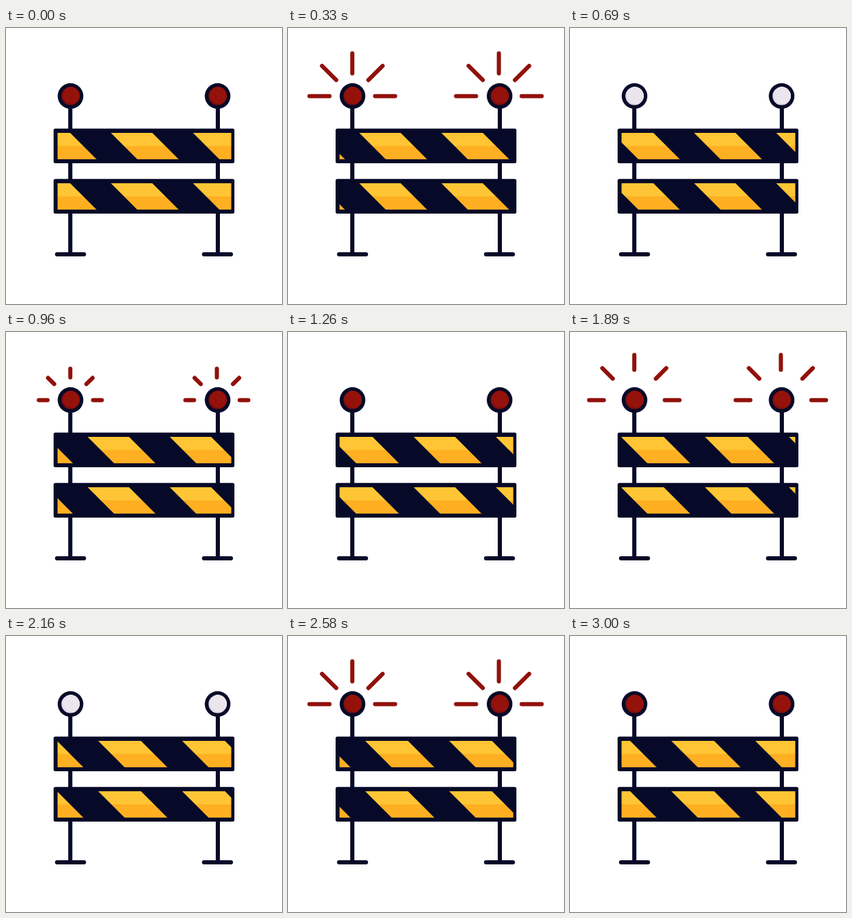
An HTML page for the animation above (5090 ms loop, 400 px wide and 400 px high).

```html
<!DOCTYPE html>
<html lang="en">
<head>
<meta charset="utf-8">
<title>Road barrier</title>
<style>
  html, body { margin: 0; width: 100%; height: 100%; overflow: hidden; background: #fff; }
  svg { display: block; width: 100%; height: 100%; }
</style>
</head>
<body>
<svg id="stage" viewBox="0 0 400 400">
  <defs>
    <clipPath id="panel"><rect x="74.7" y="151.7" width="251.8" height="38.6"/></clipPath>
    <linearGradient id="amber" gradientUnits="userSpaceOnUse" x1="0" y1="151" x2="0" y2="191">
      <stop offset=".5" stop-color="#ffc534"/>
      <stop offset=".5" stop-color="#ffaf22"/>
    </linearGradient>
    <clipPath id="bulb"><circle r="13.5"/></clipPath>
  </defs>
  <g fill="none" stroke="#060a28" stroke-width="6" stroke-linecap="round">
    <path d="M93.2 112V328M74 328H113M307 112V328M287 328H326"/>
  </g>
  <g id="bars"></g>
  <g id="lamps"></g>
  <path id="rays" fill="none" stroke="#91110b" stroke-width="6" stroke-linecap="round"/>
</svg>
<script>
const LOOP = 5090, ACTIVE = 3000, STEP = 30, BLINK = 750;
const byId = id => document.getElementById(id);
const clamp = v => Math.min(1, Math.max(0, v));
const ramp = (t, a, b) => clamp((t - a) / (b - a));

// Stripe travel keys: time, distance, speed
const travel = [
  [0, 0, 0.213], [1620, 345, 0.2135], [2160, 463, 0.224],
  [2580, 563, 0.249], [3000, 598, 0]
];

function distance(t) {
  let i = 0;
  while (i < travel.length - 2 && t > travel[i + 1][0]) i++;
  const [t0, d0, v0] = travel[i], [t1, d1, v1] = travel[i + 1];
  const h = t1 - t0, u = (t - t0) / h, w = 1 - u;
  return d0 * w * w * (1 + 2 * u) + d1 * u * u * (3 - 2 * u)
       + h * u * w * (v0 * w - v1 * u);
}

function stripePath() {
  let d = '';
  for (let i = -1; i < 9; i++) {
    const wide = i > 3;
    const x = wide ? -86 - 121.7 * (i - 3) : 271 - 119 * i;
    const w = wide ? 62 : 60;
    d += `M${x} 152h${w}l40 40h${-w}z`;
  }
  return d;
}

byId('bars').innerHTML = [0, 73].map(y => `
  <g transform="translate(0 ${y})">
    <rect x="69" y="145.7" width="262" height="50.3" rx="2.5" fill="#060a28"/>
    <g clip-path="url(#panel)"><path class="stripes" fill="url(#amber)" d="${stripePath()}"/></g>
  </g>`).join('');

byId('lamps').innerHTML = [93.5, 306.7].map(x => `
  <g transform="translate(${x} 98.6)">
    <circle r="18.6" fill="#060a28"/>
    <circle class="shade" r="13.2"/>
    <circle class="glow" r="12.6" cx="1.6" cy="-1.4" clip-path="url(#bulb)"/>
  </g>`).join('');

const stripes = document.querySelectorAll('.stripes');
const shades = document.querySelectorAll('.shade');
const glows = document.querySelectorAll('.glow');
const rays = byId('rays');
const paint = (nodes, name, value) => nodes.forEach(n => n.setAttribute(name, value));

function rayPath(inner, outer) {
  let d = '';
  for (const cx of [93.2, 305.6]) {
    for (let k = 0; k < 5; k++) {
      const a = Math.PI * (1 + k / 4), c = Math.cos(a), s = Math.sin(a);
      const at = r => `${(cx + r * c).toFixed(2)} ${(98.8 + r * s).toFixed(2)}`;
      d += `M${at(inner)}L${at(outer + 0.01)}`;
    }
  }
  return d;
}

function draw(ms) {
  const t = Math.min(ACTIVE, Math.floor((ms % LOOP) / STEP) * STEP);
  paint(stripes, 'transform', `translate(${distance(t).toFixed(2)} 0)`);

  const p = t % BLINK;
  const off = p >= 540;
  paint(shades, 'fill', off ? '#e2dae4' : '#7d0e0c');
  paint(glows, 'fill', off ? '#ebe5ed' : '#95120b');

  const lit = p >= 110 && p < 495;
  rays.setAttribute('d', lit
    ? rayPath(33 + 32.5 * ramp(p, 335, 495), 33 + 32.5 * ramp(p, 118, 355))
    : '');
}

const start = performance.now();
function tick() {
  draw(performance.now() - start);
  requestAnimationFrame(tick);
}
tick();
</script>
</body>
</html>
```
